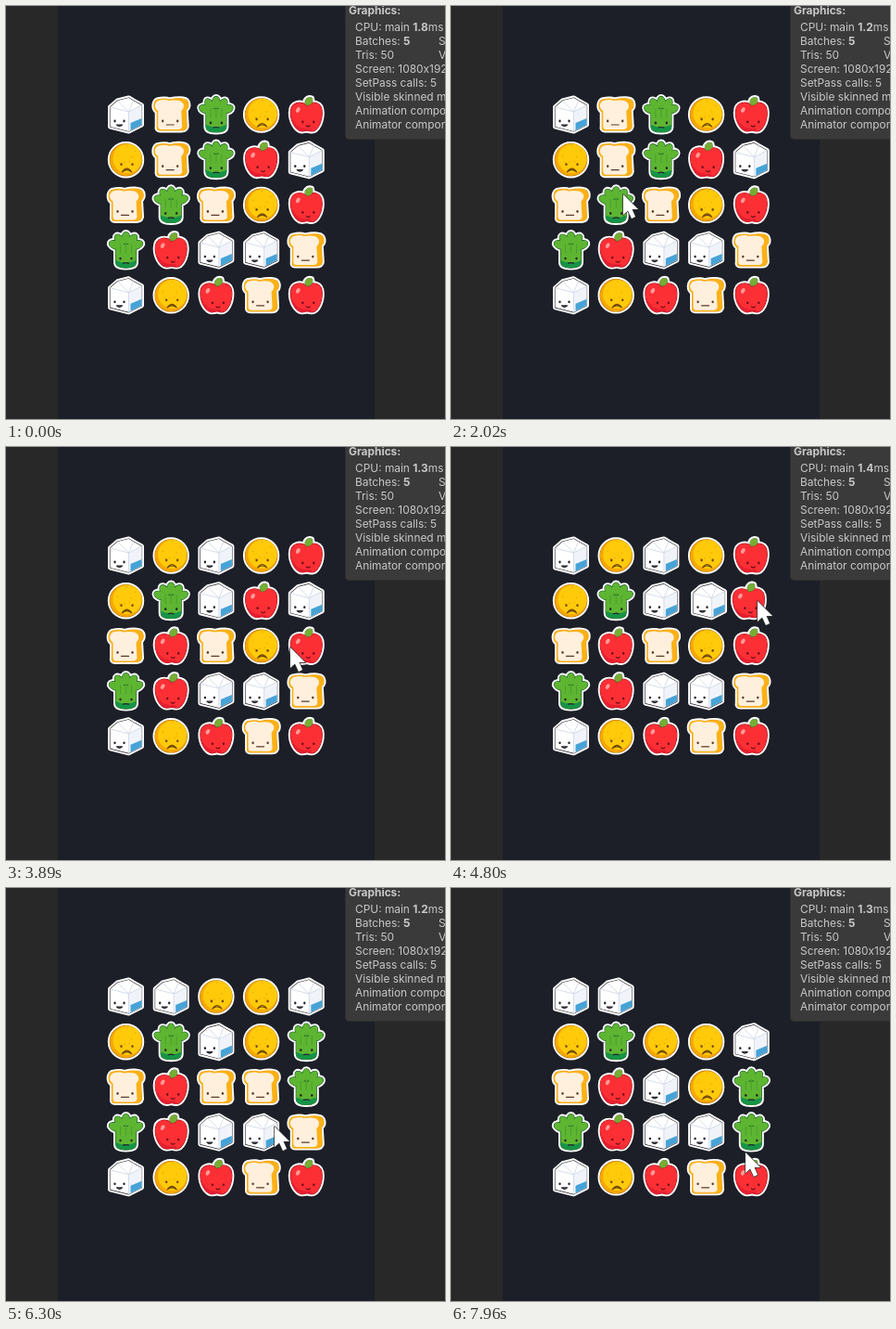
An HTML page with a canvas for the animation above (7.99 s loop, 474x445 px).

```html
<!DOCTYPE html>
<html lang="en">
<head>
<meta charset="utf-8">
<title>Match three</title>
<style>
html, body { margin: 0; width: 100%; height: 100%; overflow: hidden; background: #282828; }
canvas { display: block; }
</style>
</head>
<body>
<canvas id="stage" width="474" height="445"></canvas>
<script>
const ctx = document.getElementById('stage').getContext('2d');
const LOOP = 7990, SWAP = 250, STEP = 180;
const SIZE = 5, PITCH = 48.7, LEFT = 129.5, TOP = 117;
const INK = '#26232a';

// M milk, B bread, G greens, O orange, A apple
const START = 'MBGOA' + 'OBGAM' + 'BGBOA' + 'GAMMB' + 'MOABA';
const REFILL = [...'OMGMABGMGOOMMOOOB'];
const MOVES = [{ at: 2560, a: 11, b: 12 }, { at: 4612, a: 8, b: 9 }, { at: 7222, a: 14, b: 19 }];

// time, x, y of the pointer tip
const POINTER = [
  [600, 478, 314], [1360, 202, 268], [2000, 186, 203], [2200, 186, 203], [2500, 234, 212],
  [3350, 285, 254], [3890, 307, 216], [4250, 285, 170], [4550, 331, 166], [4850, 331, 166],
  [6300, 290, 257], [6950, 324, 262], [7200, 316, 220], [7430, 316, 220], [7840, 318, 285]
];

const col = i => i % SIZE, row = i => Math.floor(i / SIZE);
const easeOut = p => 1 - (1 - p) ** 2;
const smooth = p => p * p * (3 - 2 * p);
const mix = (a, b, p) => a + (b - a) * p;

function findMatches(board) {
  const hits = new Set();
  board.forEach((kind, i) => {
    for (const [step, fits] of [[1, col(i) < SIZE - 2], [SIZE, row(i) < SIZE - 2]]) {
      const run = [i, i + step, i + 2 * step];
      if (kind && fits && run.every(j => board[j] === kind)) run.forEach(j => hits.add(j));
    }
  });
  return hits;
}

// Where every cell's tile lands once the gaps below it close.
function landings(board) {
  return board.map((_, i) => {
    let to = i;
    for (let j = i + SIZE; j < board.length; j += SIZE) if (!board[j]) to += SIZE;
    return to;
  });
}

// Plays the moves once; each phase holds tiles that go from one cell and scale to another.
function plan() {
  let board = [...START], at = 0;
  const phases = [];
  const add = (length, change) => {
    const tiles = board.flatMap((kind, i) =>
      kind ? [{ kind, from: i, to: i, s0: 1, s1: 1, ...change(i) }] : []);
    phases.push({ at, length, tiles });
    at += length;
    board = board.map(() => null);
    for (const tile of tiles) if (tile.s1) board[tile.to] = tile.kind;
  };
  add(1, () => ({}));
  for (const { at: start, a, b } of MOVES) {
    at = start;
    add(SWAP, i => i === a ? { to: b } : i === b ? { to: a } : {});
    for (let hits; (hits = findMatches(board)).size;) {
      add(STEP, i => hits.has(i) ? { s1: 0 } : {});
      const to = landings(board);
      if (board.some((kind, i) => kind && to[i] !== i)) add(STEP, i => ({ to: to[i] }));
      if (!REFILL.length) break;
      const empty = board.map(kind => !kind);
      board = board.map(kind => kind || REFILL.shift());
      add(STEP, i => empty[i] ? { s0: 0 } : {});
    }
  }
  return phases;
}
const PHASES = plan();

function paint(path, fill) {
  ctx.fillStyle = fill;
  ctx.fill(path);
}
function line(path, color, width) {
  ctx.strokeStyle = color;
  ctx.lineWidth = width;
  ctx.stroke(path);
}
const shape = d => new Path2D(d);
function oval(x, y, rx, ry = rx, turn = 0) {
  const p = new Path2D();
  p.ellipse(x, y, rx, ry, turn, 0, 2 * Math.PI);
  return p;
}
function sticker(path, fill, edge) {
  line(path, '#fff', 5);
  line(path, edge, 1.2);
  paint(path, fill);
}
function face(x, y, gap, mouth, color = INK) {
  for (const side of [-1, 1]) paint(oval(x + side * gap, y, 1.2, 1.4), color);
  ctx.save();
  ctx.translate(x, y + 4);
  line(shape(mouth), color, 1.2);
  ctx.restore();
}

const MILK = shape('M-17-8L-9-15L3-18L8-15L17-10V11L3 18L-17 13Z');
const BREAD = shape('M-15-16Q-6-18-2-16Q8-18 13-17C20-16 20-8 16-5L17 13Q16 17 11 17H-12Q-16 17-15 12L-15-3C-20-6-19-14-15-16Z');
const CRUMB = shape('M-14-15Q-6-17-3-15Q4-16 9-15C15-13 15-7 11-4L12 13Q11 16 8 16H-11Q-14 16-14 12L-14-4C-19-7-18-13-14-15Z');
const APPLE = shape('M1-10C6-15 17-14 17-2C17 8 12 18 6 18Q3 18 1 17Q-2 18-5 18C-12 17-17 7-17-2C-17-14-6-15 1-10Z');
const LEAF = shape('M0-10C-4-15 1-20 6-18C8-13 5-10 0-10Z');
const STALK = shape('M-11-6H11L11 13Q11 19 0 19Q-11 19-11 13Z');

// Five leafy fingers fan out of the stalk.
const GREENS = new Path2D(STALK);
for (let i = -2; i <= 2; i++) {
  const turn = i * .58;
  GREENS.addPath(oval(13 * Math.sin(turn), -1 - 12 * Math.cos(turn), 4.2, 6.6, turn));
}

const DRAW = {
  M() {
    sticker(MILK, '#fff', INK);
    paint(shape('M3-3L17-10V11L3 18Z'), '#f0f4fa');
    paint(shape('M5 9L17 4V11L5 17Z'), '#47a3d6');
    line(shape('M-17-8L3-3L17-10M3-3V18M-9-15L3-3L8-15'), '#ccd5e4', .8);
    face(-7, 7, 5, 'M-3 0Q0 3 3 0Z');
  },
  B() {
    sticker(BREAD, '#fbb116', '#f0a51c');
    paint(CRUMB, '#fff0dd');
    face(-1, 7, 8, 'M-4 0H4', '#5a3a2c');
  },
  G() {
    sticker(GREENS, '#5db531', '#1c5a2b');
    paint(shape('M-11 11Q0 16 11 11V13Q11 19 0 19Q-11 19-11 13Z'), '#169447');
    line(shape('M-6-6V3M0-8V3M6-6V3'), '#48a02c', 1);
    face(0, 9, 6, 'M-3 1Q0 0 3 1');
  },
  O() {
    sticker(oval(0, 0, 17.2), '#f7a700', '#b97800');
    paint(oval(1.5, -1.3, 15.6), '#ffca0a');
    for (let i = 0; i < 7; i++) {
      const r = 6 + i % 3 * 3;
      paint(oval(r * Math.cos(i * 2.4), r * Math.sin(i * 2.4) - 3, .7), '#eba400');
    }
    face(1, 5, 6, 'M-5 4Q0-3 5 4Q0 0-5 4', '#70480f');
  },
  A() {
    line(LEAF, '#fff', 5);
    sticker(APPLE, '#fc2f35', '#a5121e');
    paint(shape('M-16 3C-12 13-5 16 5 15L6 18Q3 18 1 17Q-2 18-5 18C-11 17-15 9-16 3Z'), '#e51e30');
    line(LEAF, '#37591f', .8);
    paint(LEAF, '#76ad32');
    paint(oval(-9, -5, 2, 3, .5), '#ff9a96');
    face(2, 8, 6, 'M-2 0Q0 2 2 0', '#6d101b');
  }
};

function drawTiles(t) {
  const { at, length, tiles } = PHASES.findLast(phase => phase.at <= t);
  const p = easeOut(Math.min(1, (t - at) / length));
  for (const { kind, from, to, s0, s1 } of tiles) {
    const s = mix(s0, s1, p);
    if (s < .01) continue;
    ctx.save();
    ctx.translate(LEFT + PITCH * mix(col(from), col(to), p), TOP + PITCH * mix(row(from), row(to), p));
    ctx.scale(s, s);
    DRAW[kind]();
    ctx.restore();
  }
}

// Each part is text; a leading * makes it bold.
function write(x, y, ...parts) {
  for (const part of parts) {
    const bold = part[0] === '*', text = bold ? part.slice(1) : part;
    ctx.font = (bold ? '700' : '400') + ' 11.9px Inter, sans-serif';
    ctx.fillText(text, x, y);
    x += ctx.measureText(text).width;
  }
}

function drawStats(t) {
  const panel = new Path2D();
  panel.roundRect(366.5, -10, 130, 153.5, 4);
  paint(panel, '#3a3a3a');
  line(panel, '#2f2f2f', 1);
  ctx.fillStyle = '#c8c8c8';
  const tick = t < 400 ? 0 : Math.floor((t - 400) / 420) + 1;
  const digit = tick ? 2 + Math.floor(tick * .816 % 1 * 3) : 8;
  write(370, 9, '*Graphics:');
  write(377, 27, 'CPU: main ', '*1.' + digit, 'ms');
  write(377, 42, 'Batches: ', '*5');
  write(467, 42, 'Saved by batching: 0');
  write(467, 57, 'Verts: 100');
  ['Tris: 50', 'Screen: 1080x1920', 'SetPass calls: 5', 'Visible skinned meshes: 0',
    'Animation components playing: 0', 'Animator components playing: 0']
    .forEach((text, i) => write(377, 57 + 15 * i, text));
}

function drawPointer(t) {
  const i = POINTER.findLastIndex(key => key[0] <= t);
  if (i < 0) return;
  const [t0, x0, y0] = POINTER[i], [t1, x1, y1] = POINTER[i + 1] || [LOOP, x0, y0];
  const p = smooth((t - t0) / (t1 - t0)), x = mix(x0, x1, p), y = mix(y0, y1, p);
  if (t > 7200 && t < 7500) paint(oval(x, y, 13), 'rgba(255,230,30,.65)');
  ctx.save();
  ctx.translate(x, y);
  const arrow = shape('M0 0V22L5 17.5L9 26L13 24L9.5 16H16Z');
  line(arrow, '#333', 1.4);
  paint(arrow, '#fff');
  ctx.restore();
}

function frame(now) {
  const t = now % LOOP;
  ctx.lineJoin = ctx.lineCap = 'round';
  ctx.fillStyle = '#282828';
  ctx.fillRect(0, 0, 474, 445);
  ctx.fillStyle = '#1c1f27';
  ctx.fillRect(56, 0, 342, 445);
  drawTiles(t);
  drawStats(t);
  drawPointer(t);
  requestAnimationFrame(frame);
}
requestAnimationFrame(frame);
</script>
</body>
</html>
```
